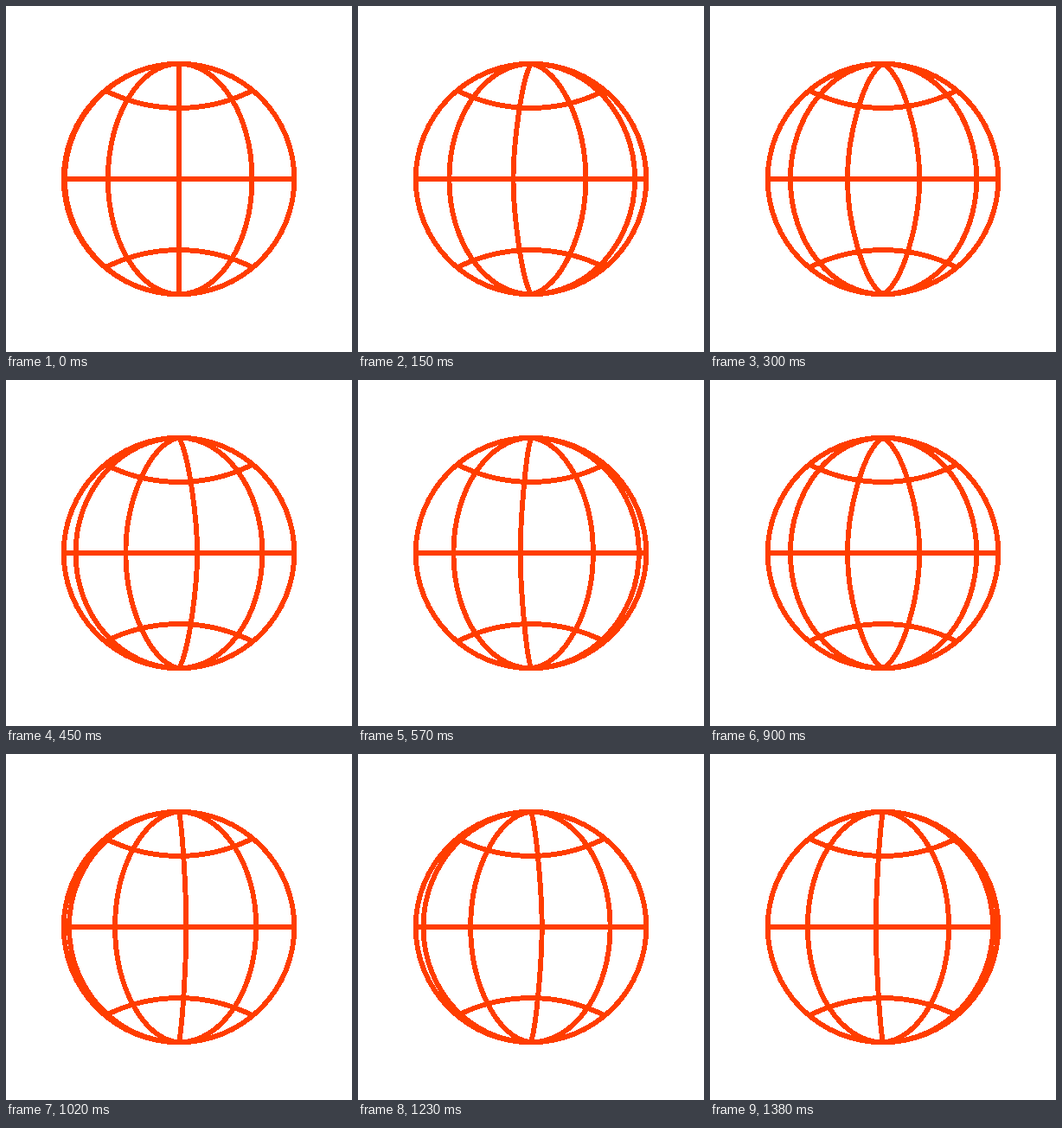
Write an HTML page that moves like this. It is 400x400 px and loops after 1.41 s.

```html
<!DOCTYPE html>
<html lang="en">
<head>
<meta charset="utf-8">
<title>Spinning globe</title>
<style>
  html, body { margin: 0; width: 100%; height: 100%; overflow: hidden; background: #fff; }
  svg { display: block; width: 100%; height: 100%; }
</style>
</head>
<body>
<svg viewBox="-75 -75 150 150" fill="none" stroke="#ff3d00" stroke-width="2.2" shape-rendering="crispEdges">
  <circle r="50"/>
  <path d="M-50 0H50"/>
  <path d="M-32 -38.4A71 71 0 0 0 32 -38.4M-32 38.4A71 71 0 0 1 32 38.4"/>
  <g id="meridians"></g>
</svg>
<script>
const RADIUS = 50, KAPPA = 0.5523;
const LOOP = 1410, STEP = 30, TURN_PER_STEP = 0.15;
const STOPS = [-49.5, -30.8, 0, 31.7, 49.5];

const group = document.getElementById('meridians');
const meridians = STOPS.slice(1).map(() =>
  group.appendChild(document.createElementNS('http://www.w3.org/2000/svg', 'path')));

const mix = (a, b, t) => a + (b - a) * t;

// Half ellipse of width x; the central one is a straight line with short handles.
function shape(x) {
  return {
    x,
    poleX: x * KAPPA,
    poleY: x ? RADIUS : RADIUS * 0.8,
    sideY: x ? RADIUS * KAPPA : RADIUS * 0.2
  };
}

function meridianPath(from, to, t) {
  const a = shape(from), b = shape(to);
  const [x, poleX, poleY, sideY] =
    ['x', 'poleX', 'poleY', 'sideY'].map(key => mix(a[key], b[key], t).toFixed(3));
  return `M0 ${-RADIUS}C${poleX} ${-poleY} ${x} ${-sideY} ${x} 0` +
         `C${x} ${sideY} ${poleX} ${poleY} 0 ${RADIUS}`;
}

function draw(time) {
  const step = Math.floor((time % LOOP) / STEP);
  const phase = (step * TURN_PER_STEP) % 1;
  meridians.forEach((path, i) =>
    path.setAttribute('d', meridianPath(STOPS[i], STOPS[i + 1], phase)));
}

function tick(now) {
  draw(now);
  requestAnimationFrame(tick);
}

draw(0);
requestAnimationFrame(tick);
</script>
</body>
</html>
```
